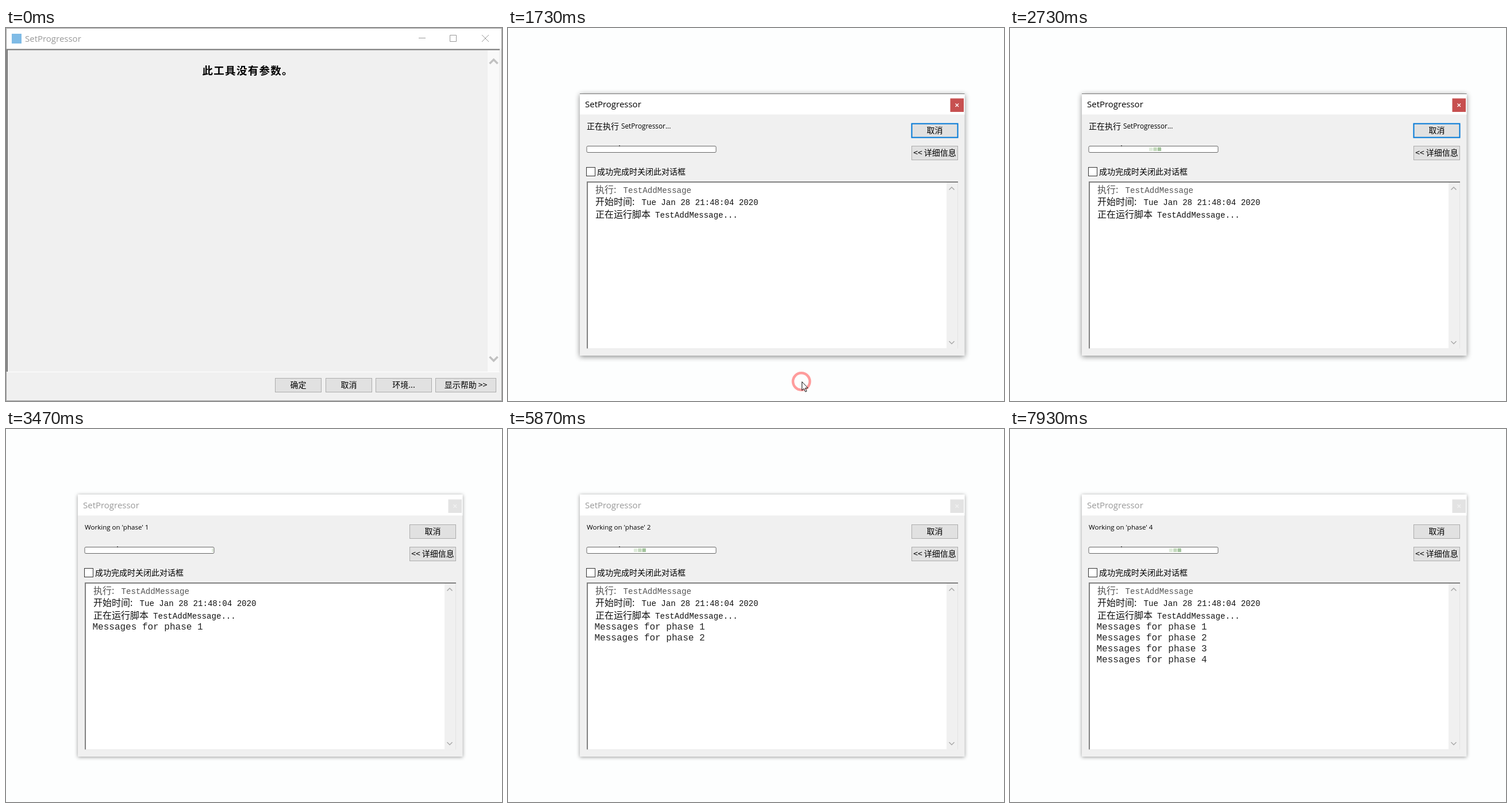
Recreate the animation shown at these times as an HTML page. Size 863 by 649 pixels, loop 8 s.

```html
<!DOCTYPE html>
<html lang="zh-CN">
<head>
<meta charset="utf-8">
<style>
html, body { margin: 0; width: 863px; height: 649px; overflow: hidden; background: #fdfefe; }
svg { display: block; }
text { font: 14px "Noto Sans CJK SC", "Noto Sans CJK", sans-serif; white-space: pre; }
.title { font: 15px "Open Sans", "Noto Sans", sans-serif; }
.small { font: 11.8px "Open Sans", "Noto Sans", sans-serif; }
.log { font-size: 16px; }
.mono { font: 14.1px "Liberation Mono", monospace; }
.message { font: 16px "Liberation Mono", monospace; fill: #222; }
.heading { font-size: 18.5px; font-weight: bold; letter-spacing: 1.3px; }
.line { fill: none; stroke: #999; }
.frame { filter: drop-shadow(0 2px 5px #0007); }
.idle .frame { filter: drop-shadow(0 1px 3px #0006); }
.idle .title { fill: #999; }
.idle .edge { display: none; }
.idle .close { fill: #e3e3e3; }
.idle .cross { stroke: #f2f2f2; }
</style>
</head>
<body>
<svg width="863" height="649" viewBox="0 0 863 649">
  <defs>
    <clipPath id="track"><rect x="140" y="207" width="221" height="8"/></clipPath>
  </defs>

  <g id="tool">
    <path fill="#f0f0f0" d="M0 0h863v649H0z"/>
    <path fill="#fff" d="M0 0h863v36H0z"/>
    <rect x="10" y="10" width="17" height="17" fill="#7fbbe6"/>
    <text class="title" x="33" y="24" fill="#999">SetProgressor</text>
    <path class="line" d="M718 17.5h12M772.5 12.5h11v11h-11zM828 12l12 12m0-12l-12 12"/>
    <path fill="#f9f9f9" d="M838 39h20v559h-20z"/>
    <path class="line" d="M2 598V37.5H859" style="stroke:#777;stroke-width:2"/>
    <path class="line" d="M1 598.5h858" style="stroke:#fff"/>
    <path class="line" d="M841.5 62l7-7 7 7M841.5 572l7 7 7-7" style="stroke:#c1c1c1;stroke-width:3.5"/>
    <text class="heading" x="341.5" y="80.5">此工具没有参数。</text>
    <g id="toolButtons"></g>
    <path class="line" d="M.5.5h862v648H.5z"/>
  </g>

  <g id="dialog">
    <path class="frame" fill="#f0f0f0" d="M125 114h669.500v456H125z"/>
    <path fill="#fff" d="M125 114h669.500v36.500H125z"/>
    <path class="line edge" d="M125 114.500h669.500" style="stroke:#777"/>
    <text class="title" x="134" y="138">SetProgressor</text>
    <path class="close" fill="#c75050" d="M769.500 122.500h23.500v23.500h-23.500z"/>
    <path class="cross" stroke="#fff" stroke-width="1.3" d="M778.500 131.500l5.500 5.500m0-5.500l-5.500 5.500"/>
    <g id="starting">
      <text x="137" y="175.500">正在执行</text>
      <text class="small" x="197" y="175">SetProgressor...</text>
    </g>
    <text class="small" id="working" x="137" y="175" style="font-size:11.55px"></text>
    <rect x="137" y="205.500" width="225" height="11" rx="2" fill="#fff" stroke="#666"/>
    <path d="M193 204.500h2v1h-2z"/>
    <g clip-path="url(#track)">
      <g id="blocks">
        <path fill="#e0ecdc" d="M0 207.500h6.300v6.500H0z"/>
        <path fill="#c4d9bd" d="M7.400 207.500h6.300v6.500H7.400z"/>
        <path fill="#a3c39c" d="M14.800 207.500h6.300v6.500h-6.300z"/>
      </g>
    </g>
    <rect x="136.500" y="242.500" width="15" height="15" fill="#fff" stroke="#333"/>
    <text x="155" y="255">成功完成时关闭此对话框</text>
    <path fill="#fff" d="M137 267h646v291.500H137z"/>
    <path fill="#f0f0f0" d="M763 269h19v288h-19z"/>
    <path class="line" d="M138 558V268h645" style="stroke:#808080;stroke-width:2"/>
    <path class="line" d="M137 558h645.500V269" style="stroke:#e3e3e3"/>
    <path class="line" d="M767.500 281.500l4.500-4.500 4.500 4.500M767.500 545l4.500 4.500 4.500-4.500" style="stroke:#aaa;stroke-width:1.5"/>
    <g id="log"></g>
    <g id="dialogButtons"></g>
  </g>

  <circle id="ring" cx="510.500" cy="615" fill="none" stroke="#f77" stroke-width="4.500"/>
  <path id="cursor" fill="#fff" stroke="#111" d="M.5.5v15l3.400-3.200 2.500 5.700 2.300-1-2.500-5.600h4.600z"/>
</svg>

<script>
const LOOP = 8000, FRAME = 1000 / 15;
const PRESS = 1530, SWITCH = 1730, CURSOR_IN = 330, CURSOR_OUT = 2130;
const PHASES = [3300, 4800, 6300, 7800];
const LAPS = [-11, 12, 34, 58]; // block step at which each sweep begins

const el = id => document.getElementById(id);
const show = (node, on) => node.style.display = on ? '' : 'none';
const clamp = v => Math.max(0, Math.min(1, v));

function add(parent, tag, attrs, content = '') {
  const node = document.createElementNS('http://www.w3.org/2000/svg', tag);
  for (const key in attrs) node.setAttribute(key, attrs[key]);
  node.textContent = content;
  return parent.appendChild(node);
}

function button(parent, x, y, width, label) {
  const box = add(parent, 'rect', {
    x: x + .5, y: y + .5, width: width - 1, height: 24, fill: '#e1e1e1', stroke: '#adadad'
  });
  add(parent, 'text', { x: x + width / 2, y: y + 17, 'text-anchor': 'middle' }, label);
  return box;
}

function logLine(y, label, x, value, fill = '#111') {
  add(el('log'), 'text', { class: 'log', x: 152, y, fill }, label);
  add(el('log'), 'text', { class: 'mono', x, y, fill }, value);
}

function paint(box, fill, stroke, width = 1) {
  box.setAttribute('fill', fill);
  box.setAttribute('stroke', stroke);
  box.setAttribute('stroke-width', width);
}

const mix = (a, b, p) => `rgb(${a.map((v, i) => Math.round(v + (b[i] - v) * p))})`;

const ok = button(el('toolButtons'), 468, 609, 81, '确定');
button(el('toolButtons'), 556, 609, 81, '取消');
button(el('toolButtons'), 643, 609, 98, '环境...');
button(el('toolButtons'), 747, 609, 106, '显示帮助 >>');
const cancel = button(el('dialogButtons'), 702, 166, 81, '取消');
button(el('dialogButtons'), 702, 205, 81, '<< 详细信息');

logLine(287, '执行:', 200.5, 'TestAddMessage', '#555');
logLine(308, '开始时间:', 232.5, 'Tue Jan 28 21:48:04 2020');
logLine(330, '正在运行脚本', 256, 'TestAddMessage...');
const messages = PHASES.map((_, i) =>
  add(el('log'), 'text', { class: 'message', x: 150.5, y: 349 + 19 * i }, `Messages for phase ${i + 1}`));

function drawTool(t) {
  const hover = clamp((t - 1000) / 200);
  if (t >= PRESS) paint(ok, '#cce4f7', '#005499');
  else paint(ok, mix([225, 225, 225], [229, 241, 251], hover), mix([173, 173, 173], [0, 120, 215], hover));
}

function drawDialog(t, frame) {
  const phase = PHASES.filter(start => t >= start).length;
  el('dialog').setAttribute('class', phase ? 'idle' : '');
  show(el('starting'), !phase);
  el('working').textContent = phase ? `Working on 'phase' ${phase}` : '';
  messages.forEach((line, i) => show(line, i < phase));
  if (phase) paint(cancel, '#e1e1e1', '#adadad');
  else paint(cancel, '#e1e1e1', '#0078d7', 2);

  // the blocks tick slightly slower than the picture does
  const step = Math.floor(.045 + (frame - 41) * .9273);
  const lap = LAPS.filter(start => step >= start).pop() ?? LAPS[0];
  el('blocks').setAttribute('transform', `translate(${114.4 + 11.6 * (step - lap)})`);
}

function drawPointer(t) {
  const left = 1 - clamp((t - CURSOR_IN) / 740);
  const away = left * left;
  show(el('cursor'), t >= CURSOR_IN && t < CURSOR_OUT);
  el('cursor').setAttribute('transform', `translate(${511 + 331 * away} ${615 - 403 * away})`);

  const age = (t - PRESS) / 540;
  show(el('ring'), age >= 0 && age < 1);
  el('ring').setAttribute('r', Math.max(0, 7 + 20 * age));
  el('ring').setAttribute('opacity', clamp(1.1 - age));
}

function draw(now) {
  const time = now % LOOP;
  const frame = Math.floor((time + 3.4) / FRAME);
  const t = frame * FRAME + 4;
  show(el('tool'), t < SWITCH);
  show(el('dialog'), t >= SWITCH);
  drawTool(t);
  drawDialog(t, frame);
  drawPointer(t);
}

const begin = performance.now();
function tick() {
  draw(performance.now() - begin);
  requestAnimationFrame(tick);
}
tick();
</script>
</body>
</html>
```
